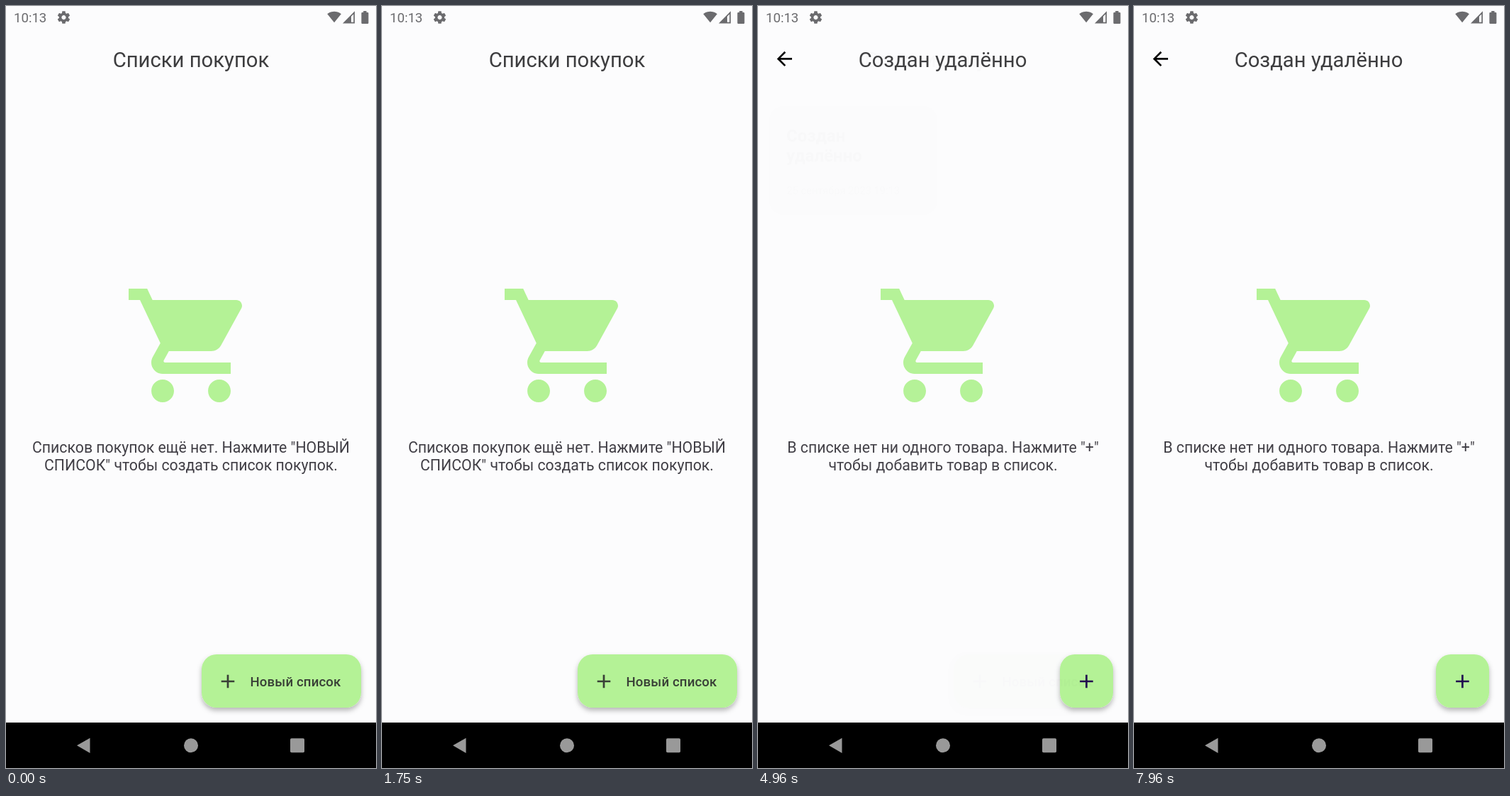
Recreate the animation shown at these times as an HTML page. Size 522 px wide and 1073 px high, loop 8 s.

```html
<!DOCTYPE html>
<html lang="ru">
<head>
<meta charset="utf-8">
<title>Списки покупок</title>
<style>
  html, body { margin: 0; width: 100%; height: 100%; overflow: hidden; background: #fcfcfd; }
  svg { display: block; width: 100%; height: 100%; }
  text { font-family: Roboto, "Noto Sans", sans-serif; fill: #3d3d3f; }
  .mid { text-anchor: middle; }
  .title { font-size: 29.25px; }
  .body { font-size: 21.27px; fill: #403e45; }
  .name { font-size: 24px; font-weight: 700; }
  .date { font-size: 14.6px; fill: #7d807c; }
  .label { font-size: 18.6px; font-weight: 500; letter-spacing: .13px; fill: #394037; }
  .clock { font-size: 18.6px; fill: #6b6b6e; }
  .green { fill: #b4f296; }
  .plus { fill: none; stroke-width: 2.7; }
</style>
</head>
<body>
<svg viewBox="0 0 522 1073">
  <defs>
    <filter id="shadow" x="-20%" y="-30%" width="140%" height="170%">
      <feDropShadow dx="0" dy="4" stdDeviation="3.5" flood-color="#000" flood-opacity=".28"/>
    </filter>
    <path id="cart" class="green" transform="translate(165 382) scale(8)" d="M7 18c-1.1 0-1.99.9-1.99 2S5.9 22 7 22s2-.9 2-2-.9-2-2-2zM1 2v2h2l3.6 7.59-1.35 2.45c-.16.28-.25.61-.25.96 0 1.1.9 2 2 2h12v-2H7.42c-.14 0-.25-.11-.25-.25l.03-.12.9-1.63h7.45c.75 0 1.41-.41 1.75-1.03l3.58-6.49c.08-.14.12-.31.12-.48 0-.55-.45-1-1-1H5.21l-.94-2H1zm16 16c-1.1 0-1.99.9-1.99 2s.89 2 1.99 2 2-.9 2-2-.9-2-2-2z"/>
    <path id="plus" class="plus" d="M-9.3 0H9.3M0-9.3V9.3"/>
  </defs>
  <rect width="522" height="1073" fill="#fcfcfd"/>

  <g id="lists">
    <text class="title mid" x="261" y="86">Списки покупок</text>
    <g id="empty">
      <use href="#cart"/>
      <text class="body mid" x="261" y="628.5">Списков покупок ещё нет. Нажмите "НОВЫЙ</text>
      <text class="body mid" x="261" y="653.5">СПИСОК" чтобы создать список покупок.</text>
    </g>
    <g id="card">
      <rect x="16" y="141" width="237" height="153" rx="21" fill="#e9eee4"/>
      <text class="name" x="40" y="191.3">Создан</text>
      <text class="name" x="40" y="219.4">удалённо</text>
      <text class="date" x="40.5" y="265.3">25 сентября 2023 19:13</text>
    </g>
    <rect class="green" x="276" y="913" width="225" height="75" rx="21" filter="url(#shadow)"/>
    <use href="#plus" x="313" y="951" stroke="#394037"/>
    <text class="label" x="344.5" y="957.8">Новый список</text>
  </g>

  <g id="detail">
    <rect width="522" height="1009" fill="#fcfcfd"/>
    <path transform="translate(21.4 58.5) scale(1.329)" d="M20 11H7.83l5.59-5.59L12 4l-8 8 8 8 1.41-1.41L7.83 13H20v-2z"/>
    <text class="title mid" x="260.5" y="86">Создан удалённо</text>
    <use href="#cart"/>
    <text class="body mid" x="261" y="628.5">В списке нет ни одного товара. Нажмите "+"</text>
    <text class="body mid" x="261" y="653.5">чтобы добавить товар в список.</text>
    <rect class="green" x="426" y="913" width="75" height="75" rx="21" filter="url(#shadow)"/>
    <use href="#plus" x="463.4" y="951" stroke="#21084f"/>
  </g>

  <g fill="#6b6b6e">
    <text class="clock" x="11" y="23.4">10:13</text>
    <path transform="translate(70.9 5.5) scale(.88)" d="M19.43 12.98c.04-.32.07-.64.07-.98s-.03-.66-.07-.98l2.11-1.65c.19-.15.24-.42.12-.64l-2-3.46c-.12-.22-.39-.3-.61-.22l-2.49 1c-.52-.4-1.08-.73-1.69-.98l-.38-2.65C14.46 2.18 14.25 2 14 2h-4c-.25 0-.46.18-.49.42l-.38 2.65c-.61.25-1.17.59-1.69.98l-2.49-1c-.23-.09-.49 0-.61.22l-2 3.46c-.13.22-.07.49.12.64l2.11 1.65c-.04.32-.07.65-.07.98s.03.66.07.98l-2.11 1.65c-.19.15-.24.42-.12.64l2 3.46c.12.22.39.3.61.22l2.49-1c.52.4 1.08.73 1.69.98l.38 2.65c.03.24.24.42.49.42h4c.25 0 .46-.18.49-.42l.38-2.65c.61-.25 1.17-.59 1.69-.98l2.49 1c.23.09.49 0 .61-.22l2-3.46c.12-.22.07-.49-.12-.64l-2.11-1.65zM12 15.5c-1.93 0-3.5-1.57-3.5-3.5s1.57-3.5 3.5-3.5 3.5 1.57 3.5 3.5-1.57 3.5-3.5 3.5z"/>
    <path transform="translate(453 5.3) scale(.84)" d="M12 21.5L23.64 7c-.45-.34-4.93-4-11.64-4S.81 6.66.36 7z"/>
    <path fill-rule="evenodd" d="M475 24.5L492 7.3V24.5zM487 14.8V22.8H490.3V11.4z"/>
    <path d="M504.2 7h4.4v2h1.6q1.2 0 1.2 1.2v13.6q0 1.2-1.2 1.2h-7.6q-1.2 0-1.2-1.2V10.2q0-1.2 1.2-1.2h1.6z"/>
  </g>

  <rect y="1009" width="522" height="64"/>
  <g fill="#999">
    <path d="M100 1041.3L118.5 1030.7V1052z"/>
    <circle cx="261" cy="1041.3" r="10"/>
    <rect x="401" y="1031.3" width="20" height="20" rx="1.8"/>
  </g>
</svg>
<script>
  const LOOP = 8000;
  const CARD_IN = 2302;
  const OPEN = 4390, OPEN_TIME = 700;
  const el = id => document.getElementById(id);
  const empty = el("empty"), card = el("card"), detail = el("detail");
  const show = (node, alpha) => {
    node.setAttribute("opacity", alpha.toFixed(3));
    node.style.display = alpha > 0 ? "" : "none";
  };

  // critically damped spring, t in seconds
  const spring = t => t <= 0 ? 0 : 1 - (1 + 20 * t) * Math.exp(-20 * t);

  // cubic-bezier(.4, 0, .2, 1)
  function ease(x) {
    if (x <= 0) return 0;
    if (x >= 1) return 1;
    let lo = 0, hi = 1;
    for (let i = 0; i < 24; i++) {
      const s = (lo + hi) / 2, r = 1 - s;
      if (1.2 * r * r * s + .6 * r * s * s + s ** 3 < x) lo = s; else hi = s;
    }
    return 3 * lo * lo - 2 * lo ** 3;
  }

  function draw(t) {
    show(empty, t < CARD_IN ? 1 : 0);
    show(card, spring((t - CARD_IN) / 1000));
    show(detail, ease((t - OPEN) / OPEN_TIME));
  }

  const start = performance.now();
  function tick() {
    draw((performance.now() - start) % LOOP);
    requestAnimationFrame(tick);
  }
  tick();
</script>
</body>
</html>
```
